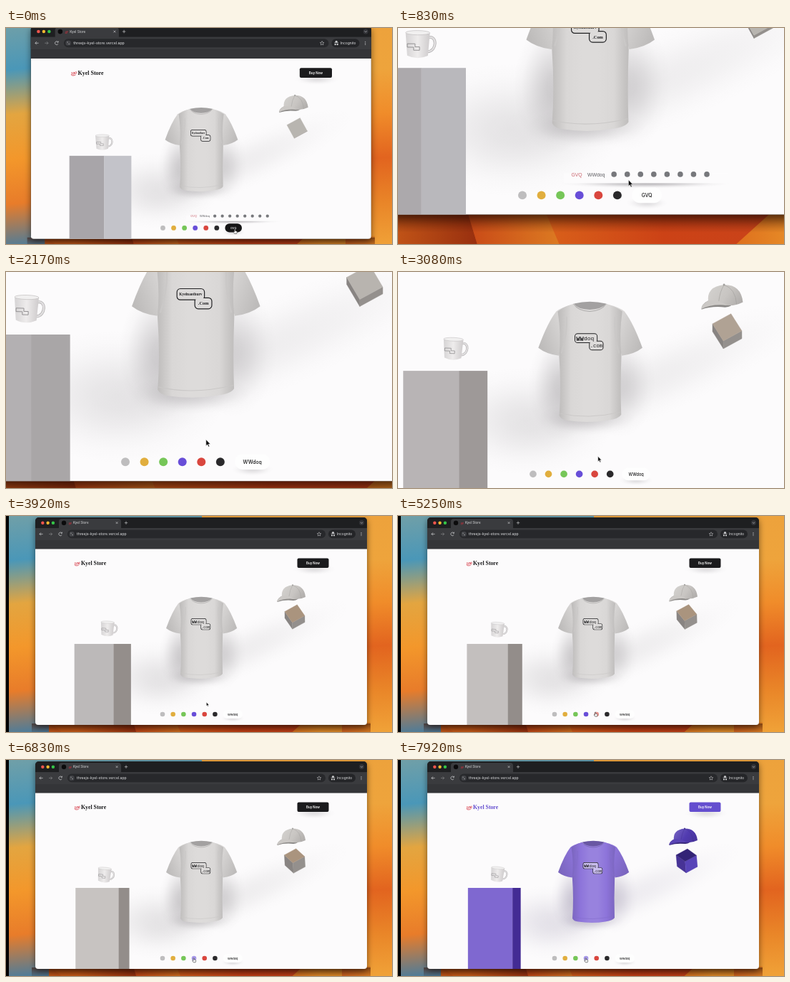
These frames come from a looping animation (540 px wide and 304 px high, 8000 ms). An HTML page with a canvas:

```html
<!DOCTYPE html>
<html lang="en">
<head>
<meta charset="utf-8">
<title>Kyel Store</title>
<style>
html, body { margin: 0; width: 100%; height: 100%; overflow: hidden; background: #000; }
canvas { display: block; width: 100vw; height: 100vh; }
</style>
</head>
<body>
<canvas id="stage"></canvas>
<script>
const W = 540, H = 304, LOOP = 8000, STEP = 1000 / 12;
const canvas = document.getElementById('stage');
const c = canvas.getContext('2d');
const dpr = Math.max(1, window.devicePixelRatio || 1);
canvas.width = W * dpr;
canvas.height = H * dpr;

const SANS = '"Liberation Sans", Arial, sans-serif';
const SERIF = '"Liberation Serif", serif';
const MONO = '"Liberation Mono", monospace';
const UI = 'Inter, sans-serif';
const INK = '#202022';

// Pointer stops: time, x, y
const STOPS = [[250, 319, 281], [830, 303, 267], [1300, 281.5, 261.5], [4700, 280.3, 262.5],
  [5250, 276, 276.3], [5600, 276, 276.3], [6500, 262.6, 279]];
const MENU_CLOSE = 1950, PRINT_SWAP = 2420, TINT_START = 7000;

const clamp = u => Math.min(1, Math.max(0, u));
const ease = (t, from, to) => {
  const u = clamp((t - from) / (to - from));
  return u * u * (3 - 2 * u);
};
const rgb = a => `rgb(${a.map(Math.round)})`;
const blend = (a, b, k) => a.map((v, i) => v + (b[i] - v) * k);
const shade = (a, k) => blend(a, k < 0 ? [0, 0, 0] : [255, 255, 255], Math.abs(k));

function camera(t) {
  const zoom = ease(t, -100, 830) * (1 - ease(t, 2680, 3580));
  const pan = ease(t, 830, 1400);
  // The vertical move trails the zoom a little
  return [1 + .81 * zoom, -(226 + 3.4 * pan) * zoom, -(269.6 - 31.8 * pan) * zoom ** 1.17];
}
function cursor(t) {
  return STOPS.slice(1).reduce((p, [time, x, y], i) =>
    blend(p, [x, y], ease(t, STOPS[i][0], time)), STOPS[0].slice(1));
}

function text(s, x, y, size, color, font = UI, weight = 400, align = 'left') {
  c.font = `${weight} ${size}px ${font}`;
  c.fillStyle = color;
  c.textAlign = align;
  c.fillText(s, x, y);
}
function box(x, y, w, h, fill) {
  c.fillStyle = fill;
  c.fillRect(x, y, w, h);
}
function round(x, y, w, h, r, fill) {
  c.beginPath();
  c.roundRect(x, y, w, h, r);
  c.fillStyle = fill;
  c.fill();
}
function dot(x, y, r, fill) {
  c.beginPath();
  c.arc(x, y, r, 0, 7);
  c.fillStyle = fill;
  c.fill();
}
function shape(d, fill, stroke, width = .7) {
  const p = new Path2D(d);
  if (fill) { c.fillStyle = fill; c.fill(p); }
  if (stroke) { c.strokeStyle = stroke; c.lineWidth = width; c.stroke(p); }
}
function blob(x, y, rx, ry, alpha, tone = [120, 116, 122], turn = 0) {
  c.save();
  c.translate(x, y);
  c.rotate(turn);
  c.scale(rx, ry);
  const g = c.createRadialGradient(0, 0, 0, 0, 0, 1);
  for (let i = 0; i <= 5; i++)
    g.addColorStop(i / 5, `rgba(${tone.map(Math.round)},${alpha * (1 - ease(i, 0, 5))})`);
  box(-1, -1, 2, 2, g);
  c.restore();
}
function ramp(x0, y0, x1, y1, ...colors) {
  const g = c.createLinearGradient(x0, y0, x1, y1);
  colors.forEach((col, i) => g.addColorStop(i / (colors.length - 1), col));
  return g;
}

function wallpaper() {
  box(0, -20, 620, 360, '#000');
  box(4, -20, 270, 360, ramp(20, 0, 50, 304, '#6f9fa8', '#4a97b8', '#e3a540', '#f3972b', '#e87c2a', '#4a7c9c'));
  box(274, -20, 330, 360, ramp(515, 0, 530, 304, '#eda23c', '#eea43c', '#f08c2a', '#e2641f', '#e98528', '#f0a238'));
  box(60, 290, 450, 60, ramp(60, 0, 510, 0, '#cf5f1b', '#a8360f', '#d9601a', '#cc4216', '#c9431a', '#e58626'));
  shape('M60 290H178L190 330H110Z', ramp(100, 0, 185, 0, '#d0611a', '#99300f'));
  shape('M178 290L190 330H255L238 290Z', ramp(180, 0, 250, 0, '#c94a17', '#dc7a22'));
  shape('M416 290L372 330H470V290Z', ramp(380, 0, 440, 0, '#dd6c1c', '#e9932a'));
  box(36, 292, 474, 16, ramp(0, 292, 0, 308, 'rgba(50,10,0,.5)', 'rgba(50,10,0,0)'));
}

function hundred(x, y, size) {
  c.save();
  c.translate(x, y);
  c.transform(1, -.12, -.12, 1, 0, 0);
  text('100', 0, 0, size, '#d32f3c', SANS, 'bold', 'center');
  box(-size * .65, size * .16, size * 1.3, size * .1, '#d32f3c');
  box(-size * .4, size * .34, size * .9, size * .09, '#d32f3c');
  c.restore();
}

function chrome() {
  const icon = '#d6d7d9';
  round(41, 2, 464, 30, [5, 5, 0, 0], '#1e1f21');
  ['#f2564d', '#f4b92f', '#35c648'].forEach((col, i) => dot(51.3 + i * 7.3, 9.7, 2.2, col));
  round(74, 4, 87, 14, [4, 4, 0, 0], '#3a3b3e');
  dot(81, 9.7, 3.2, '#0b0b0c');
  hundred(89.5, 11, 2.7);
  text('Kyel Store', 94, 11.3, 4.5, '#dfe0e2');
  shape('M153.7 8.2l2.8 2.8m0 -2.8l-2.8 2.8M165.8 9.6h4.4m-2.2 -2.2v4.4', null, icon, .6);
  dot(497.5, 9.5, 3.4, '#35363a');
  shape('M496 8.9l1.5 1.5l1.5 -1.5', null, icon, .6);

  box(41, 17, 464, 17, '#3a3b3e');
  box(41, 34, 464, 13, '#343538');
  round(86, 19.6, 361, 11.6, 5.8, '#27282b');
  shape('M51.5 25.4h-4.6m2 -2l-2 2l2 2', null, icon);
  shape('M60 25.4h4.6m-2 -2l2 2l-2 2', null, '#86878a');
  shape('M78 24a2.3 2.3 0 1 0 .2 2.4M78.4 22.6v1.7h-1.7', null, icon);
  dot(92, 25.4, 3.9, '#3b3c40');
  shape('M90 24.2h2m1.5 0h.5M90 26.6h.5m1.5 0h2', null, icon, .6);
  text('threejs-kyel-store.vercel.app', 99, 27.2, 5.1, '#e4e5e7');
  shape('M438 22.7l.8 1.8l2 .2l-1.5 1.3l.4 2l-1.7 -1l-1.7 1l.4 -2l-1.5 -1.3l2 -.2Z', null, icon, .5);
  round(451, 19.6, 38, 11.6, 5.8, '#242528');
  shape('M454.5 25h6M456 24.5l.6 -2h1.8l.6 2Z', icon, icon, .5);
  dot(456, 27.3, 1.1, icon);
  dot(459, 27.3, 1.1, icon);
  text('Incognito', 463, 27.2, 4.8, '#e4e5e7');
  for (let i = -1; i < 2; i++) dot(497, 25.4 + i * 1.9, .55, icon);
}

function shadows(k) {
  const tone = blend([122, 118, 122], [118, 108, 142], k);
  blob(330, 190, 165, 36, .1, tone, -.42);
  blob(212, 228, 85, 52, .17, tone);
  blob(246, 195, 32, 52, .34, tone);
  blob(302, 192, 34, 52, .26, tone);
  blob(270, 226, 46, 16, .3, tone);
}

function plinth(t, k) {
  const s = t / 1000;
  const l = 93.5 + .55 * s, m = 141 + 2.45 * s, r = 178 - .8 * s;
  const left = blend([168, 165, 169], [199, 195, 193], clamp(s / 6));
  const right = blend([195, 195, 201], [147, 141, 138], clamp(s / 4));
  box(l, 180, m - l, 114, rgb(blend(left, [126, 103, 208], k)));
  box(m - .2, 180, r - m + .2, 114, rgb(blend(right, [66, 42, 148], k)));
}

function mug(t) {
  c.save();
  c.translate(140.2 + 2.7 * Math.cos((t - 2800) / 1210), 160.3 - 1.6 * Math.cos((t - 3700) / 1000));
  c.rotate(t / 80000);
  const handle = 'M8 -5.5C15 -8 15.5 5 7.5 5.5';
  shape(handle, null, '#b5b3b4', 2.2);
  shape(handle, null, '#e2e0e1', 1.3);
  shape('M-9.4 -9.2L-8 8.6Q0 12.4 8 8.6L9.4 -9.2Z', ramp(-9, 0, 9, 0, '#d6d4d5', '#eeecec', '#d0cdce'));
  shape('M-9.4 -9.2a9.4 1.7 0 1 0 18.8 0a9.4 1.7 0 1 0 -18.8 0', '#f1f0f0', '#c3c0c1', .4);
  shape('M-8 -.6h6v2.4h3.5v2.6h-4.6v-2.3h-4.9Z', null, '#8b898b', .5);
  c.restore();
}

function print(t, fill) {
  const rects = [[259.2, 144.7, 20.6, 8], [273, 151.8, 12.5, 7.9]];
  c.strokeStyle = INK;
  c.lineWidth = 1.3;
  for (const r of rects) {
    c.beginPath();
    c.roundRect(...r, 2.3);
    c.stroke();
  }
  for (const r of rects) round(...r, 2.3, fill);
  if (t < PRINT_SWAP) {
    text('Kyelnaothurv', 269.5, 149.7, 3, INK, SERIF, 'bold', 'center');
    text('.Com', 279.3, 157, 3.5, INK, SERIF, 'bold', 'center');
  } else {
    text('WW', 260, 151, 6, INK, MONO, 'bold');
    text('doq', 267.4, 150.9, 5.4, INK, MONO);
    text('.com', 273.4, 157.6, 4.9, INK, MONO);
  }
}

function shirt(t, k) {
  const base = blend([217, 215, 214], [140, 115, 218], k);
  const dark = rgb(shade(base, -.13)), mid = rgb(base), light = rgb(shade(base, .1));
  shape('M258 115.5Q273 112 288.5 115.5Q285 122 273 122.5Q262 122 258 115.5Z', rgb(shade(base, -.25)));
  // Both sleeves are one outline, mirrored about the middle of the shirt
  for (const side of [1, -1]) {
    c.save();
    c.translate(273.6, 0);
    c.scale(side, 1);
    shape('M-15.6 116Q-28 119 -32.5 123Q-41 134 -49.6 158Q-42 164 -30 165.5L-22 140Z', ramp(-50, 150, -24, 140, dark, mid));
    c.restore();
  }
  shape('M257.5 115.7Q262 121 273 121.4Q284 121 288.8 115.7Q299 119 304 123Q301 145 303.2 165.5Q302 195 303 222Q301 226 290 227.4Q272 230.5 252 227.6Q246 227 244 223Q246 195 243.8 165.5Q246 145 242.5 123Q248 118.5 257.5 115.7Z',
    ramp(243, 0, 304, 0, dark, mid, light, light, mid, dark));
  shape('M257.5 115.7Q262 122.6 273 123Q284 122.6 288.8 115.7', null, rgb(shade(base, -.2)));
  const fold = rgb(shade(base, -.07));
  shape('M251 128Q252 145 246 163M297 128Q296 148 301 163', null, fold, 1.2);
  shape('M244.5 220.8Q271 227 302.5 219.5', null, fold, .6);
  print(t, rgb(shade(base, .1 + .44 * k)));
}

function cap(t, k) {
  const base = blend([200, 197, 194], [80, 58, 176], k);
  const seam = rgb(shade(base, -.2));
  c.save();
  c.translate(0, Math.sin(t / 1500) * .6 - .4);
  shape('M387 112Q379 116 379.5 121Q390 117.5 402 119Q409 118 409 115Z', rgb(shade(base, -.3)));
  shape('M386 114Q384 99 401 97.4Q417 97 419 114Q411 118 403 117Q394 115 386 114Z',
    ramp(388, 98, 418, 118, rgb(shade(base, .2)), rgb(base), rgb(shade(base, -.14))));
  shape('M387 112Q379 116 379.5 120.5Q389 115.5 404 117Q396 112 387 112Z', rgb(shade(base, .05)));
  shape('M401 97.5Q397 104 396 113M401 97.5Q412 101 413 116', null, seam, .4);
  dot(401, 97.4, 1, seam);
  c.restore();
}

// A cube turning at a steady rate, seen straight on
function crate(t, k) {
  const s = t / 1000;
  const rx = .02 + .1 * s, ry = -.06 * s, rz = -.5;
  const spin = (a, b, r) => [a * Math.cos(r) - b * Math.sin(r), a * Math.sin(r) + b * Math.cos(r)];
  const turn = ([x, y, z]) => {
    [y, z] = spin(y, z, rx);
    [x, z] = spin(x, z, ry);
    [x, y] = spin(x, y, rz);
    return [x, y, z];
  };
  const greys = [[136, 132, 130], [148, 144, 141], blend([184, 181, 176], [170, 148, 126], ease(t, 2000, 4000))];
  const purples = [[70, 50, 150], [88, 67, 184], [50, 34, 118]];
  for (let axis = 0; axis < 3; axis++) for (const side of [-1, 1]) {
    const normal = [0, 0, 0];
    normal[axis] = side;
    if (turn(normal)[2] <= 0) continue;
    c.beginPath();
    for (const [u, v] of [[-1, -1], [1, -1], [1, 1], [-1, 1]]) {
      const p = [0, 0, 0];
      p[axis] = side;
      p[(axis + 1) % 3] = u;
      p[(axis + 2) % 3] = v;
      const [x, y] = turn(p);
      c.lineTo(404 + x * 10.2, 142 + y * 10.2);
    }
    c.closePath();
    c.fillStyle = c.strokeStyle = rgb(blend(greys[axis], purples[axis], k));
    c.lineWidth = .3;
    c.fill();
    c.stroke();
  }
}

// Draws the swatches, menu and label; tells whether the pointer is over one
function controls(t, x, y) {
  const open = t < MENU_CLOSE;
  const inside = (cx, cy, w, h) => Math.abs(x - cx) < w && Math.abs(y - cy) < h;
  if (open) {
    blob(316, 269.6, 66, 4, .5);
    box(253, 262, 127, 7.6, '#fcfbfc');
    text('GVQ', 263, 264.2, 3.8, '#c9636c', SANS, 400, 'center');
    text('WWdoq', 278, 264.2, 3.8, '#5c5c60', SANS, 400, 'center');
    for (let i = 0; i < 8; i++) dot(291.8 + i * 10.25, 262.7, 2.1, '#77787c');
  }
  const colors = [[190, 189, 190], [225, 174, 62], [118, 198, 88], [104, 78, 216], [217, 70, 62], [42, 41, 43]];
  let hover = open && inside(278, 263, 8, 4);
  colors.forEach((col, i) => {
    const cx = (open ? 221 : 219) + i * 14.68;
    const over = Math.hypot(x - cx, y - 279) < 3.6;
    hover = hover || over;
    dot(cx, 279, 3.3, rgb(over ? shade(col, .42) : col));
  });
  const over = inside(317.4, 279, 11, 6);
  const w = open ? 23 : 27;
  blob(317.2, 285, 16, 5, .22);
  round(317.2 - w / 2, 273, w, 12, 6, over ? '#151516' : '#fefefe');
  text(open ? 'GVQ' : 'WWdoq', 317.2, 280.7, 3.8, over ? '#fff' : '#19191a', UI, 500, 'center');
  return hover || over;
}

function pointer(x, y, hand) {
  c.save();
  c.translate(x, y);
  c.lineJoin = 'round';
  if (hand) shape('M-.5 0Q.2 -.7 .7 0V2L2.7 2.5Q3.3 2.8 3.1 3.8L2.5 5.8H-.4L-1.9 3.6Q-1.8 2.8 -.5 3.4Z', '#fff', '#222', .55);
  else shape('M0 0V4.9L1.1 3.9L1.9 5.7L2.7 5.3L1.9 3.6H3.4Z', '#0c0c0c', '#fff', .3);
  c.restore();
}

function page(t, x, y) {
  const k = 1 - Math.exp(-Math.max(0, t - TINT_START) / 190);
  c.save();
  c.beginPath();
  c.roundRect(41, 46.6, 464, 247.4, [0, 0, 4, 4]);
  c.clip();
  box(41, 46, 464, 249, '#fcfbfc');
  shadows(k);
  plinth(t, k);
  mug(t);
  shirt(t, k);
  cap(t, k);
  crate(t, k);
  const accent = rgb(blend([27, 27, 29], [101, 78, 208], k));
  hundred(99.3, 68.3, 4.8);
  text('Kyel Store', 105, 69, 7.8, accent, SERIF, 'bold');
  blob(431, 75, 30, 8, .2);
  round(407.5, 59.6, 44, 13.4, 2, accent);
  text('Buy Now', 429.5, 68, 4.4, '#fff', UI, 600, 'center');
  const hand = controls(t, x, y);
  c.restore();
  return hand;
}

function draw(t) {
  const [s, tx, ty] = camera(t);
  const [x, y] = cursor(t);
  c.setTransform(dpr * s, 0, 0, dpr * s, dpr * tx, dpr * ty);
  wallpaper();
  c.save();
  c.shadowColor = 'rgba(0,0,0,.5)';
  c.shadowBlur = 9 * s * dpr;
  c.shadowOffsetY = 3 * s * dpr;
  round(41, 2, 464, 292, 5, '#1e1f21');
  c.restore();
  chrome();
  pointer(x, y, page(t, x, y));
}

function tick() {
  const t = performance.now() % LOOP;
  draw(Math.floor((t + 4) / STEP) * STEP % LOOP);
  requestAnimationFrame(tick);
}
tick();
</script>
</body>
</html>
```
